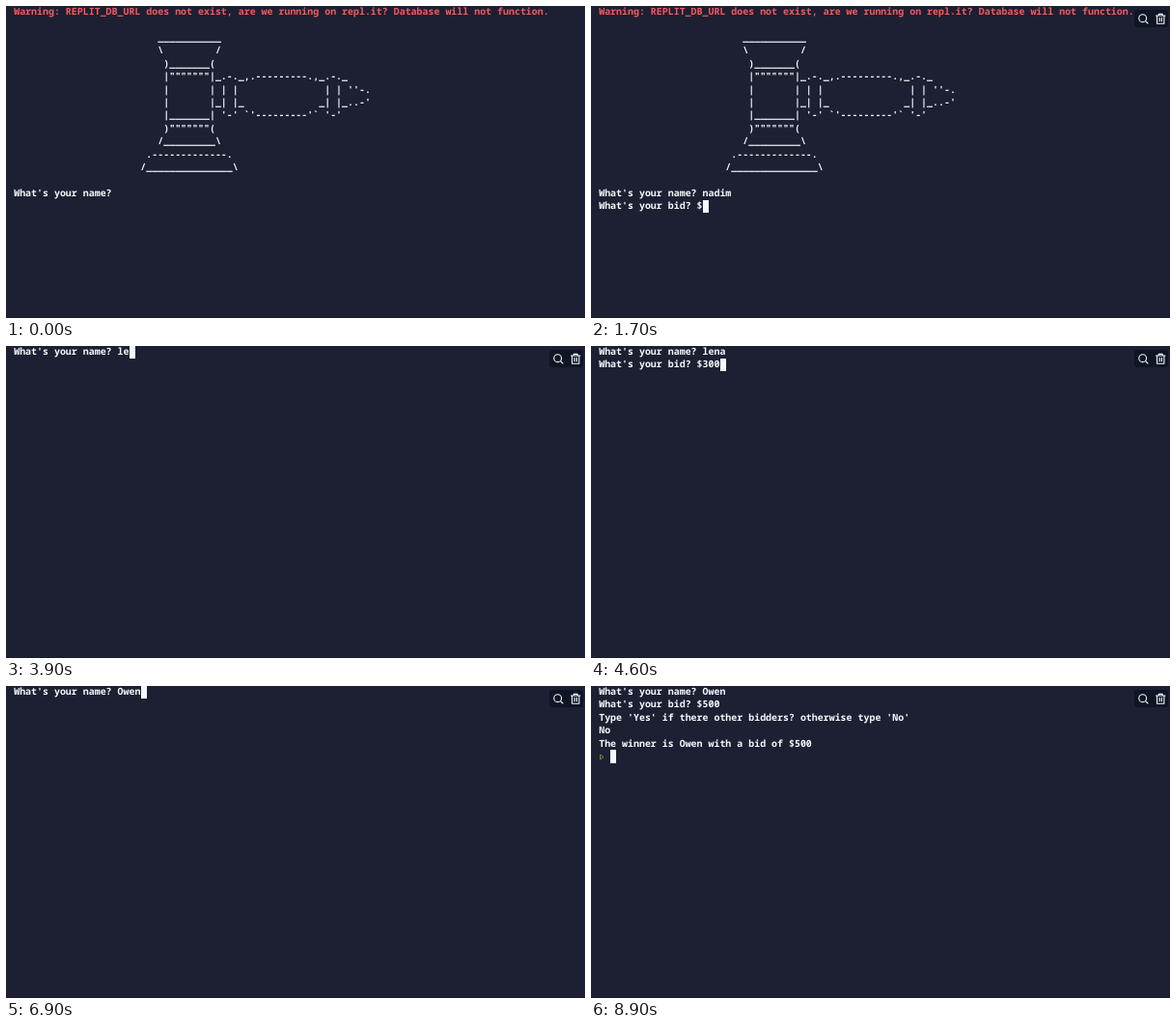
Write an HTML page that moves like this. It is 600x323 px and loops after 9 s.

```html
<!DOCTYPE html>
<html lang="en">
<head>
<meta charset="utf-8">
<title>Blind auction terminal</title>
<style>
  html, body { margin: 0; width: 100%; height: 100%; overflow: hidden; background: #1c2032; }
  #stage { position: relative; width: 600px; height: 323px; overflow: hidden; }
  #screen, #caret, #tools, #prompt, #edge { position: absolute; }
  #screen {
    left: 8.2px; top: -1px; margin: 0; color: #f5f9fc;
    font: 600 9.95px/13.42px "Noto Sans Mono", monospace;
    text-rendering: geometricPrecision; font-variant-ligatures: none;
  }
  #screen.warn::first-line { color: #f4595f; }
  #caret { width: 6px; height: 13.5px; background: #f5f9fc; }
  #tools { left: 563px; top: 4px; }
  #prompt { left: 8px; top: 69px; }
  #edge { left: 0; bottom: 0; width: 100%; height: 1px; background: #151a2b; }
</style>
</head>
<body>
<div id="stage">
  <pre id="screen"></pre>
  <div id="caret"></div>
  <svg id="prompt" width="7" height="9" fill="none" stroke="#938528"><path d="M1.6 2L5 4.5L1.6 7Z"/></svg>
  <svg id="tools" width="37" height="19" fill="none" stroke="#f5f9fc" stroke-width="1.1" stroke-linecap="round" stroke-linejoin="round">
    <rect width="35" height="18" rx="3" fill="#0e1525" stroke="none"/>
    <circle cx="8.7" cy="8.7" r="3.9"/>
    <path d="M11.6 11.6L14 14M22.5 6H32M25.3 6V4.4H29.2V6M23.6 6V14.2H30.9V6M26.2 8.4V11.8M28.4 8.4V11.8"/>
  </svg>
  <div id="edge"></div>
</div>
<script>
const LOOP = 9000, LEFT = 8.2, CELL = 5.97, ROW = 13.42;
const $ = id => document.getElementById(id);

const gavel = String.raw`
   ___________
   \         /
    )_______(
    |"""""""|_.-._,.---------.,_.-._
    |       | | |               | | ''-.
    |       |_| |_             _| |_..-'
    |_______| '-' ${"`"}'---------'${"`"} '-'
    )"""""""(
   /_________\
 .-------------.
/_______________\
`.replace(/\n(?=.)/g, "\n" + " ".repeat(22));

const warning = "Warning: REPLIT_DB_URL does not exist, are we running on repl.it? Database will not function.\n";
const askName = "What's your name? ";
const askBid = "\nWhat's your bid? $";
const askMore = "\nType 'Yes' if there other bidders? otherwise type 'No'\n";
const CLEAR = "\f";

// [start ms, text, ms per character]; no pace prints at once
const script = [
  [0, warning + gavel + "\n" + askName],
  [300, "nadim", 100],
  [1000, askBid],
  [1800, "200", 100],
  [2400, askMore],
  [2900, "Yes", 100],
  [3300, CLEAR + askName],
  [3700, "le", 100],
  [4000, "na", 100],
  [4300, askBid],
  [4400, "300", 100],
  [4800, askMore],
  [4900, "Yes", 100],
  [5300, CLEAR + askName],
  [6300, "Owen", 100],
  [7000, askBid],
  [7200, "500", 100],
  [7700, askMore],
  [8100, "No", 100],
  [8400, "\nThe winner is Owen with a bid of $500\n  "]
];

function output(t) {
  let out = "";
  for (const [start, text, pace] of script) {
    if (t < start) break;
    out += pace ? text.slice(0, Math.floor((t - start) / pace) + 1) : text;
  }
  return out.slice(out.lastIndexOf(CLEAR) + 1);
}

const show = (id, on) => $(id).style.visibility = on ? "visible" : "hidden";
let shown;

function draw(t) {
  const text = output(t), lines = text.split("\n");
  if (text !== shown) {
    $("screen").textContent = shown = text;
    $("screen").className = text.startsWith(warning) ? "warn" : "";
  }
  $("caret").style.left = LEFT + lines.at(-1).length * CELL + "px";
  $("caret").style.top = (lines.length - 1) * ROW - 0.8 + "px";
  show("caret", t >= 200);
  show("tools", t >= 200);
  show("prompt", t >= 8400);
}

const begin = performance.now();
function tick() {
  draw((performance.now() - begin) % LOOP);
  requestAnimationFrame(tick);
}
tick();
</script>
</body>
</html>
```
